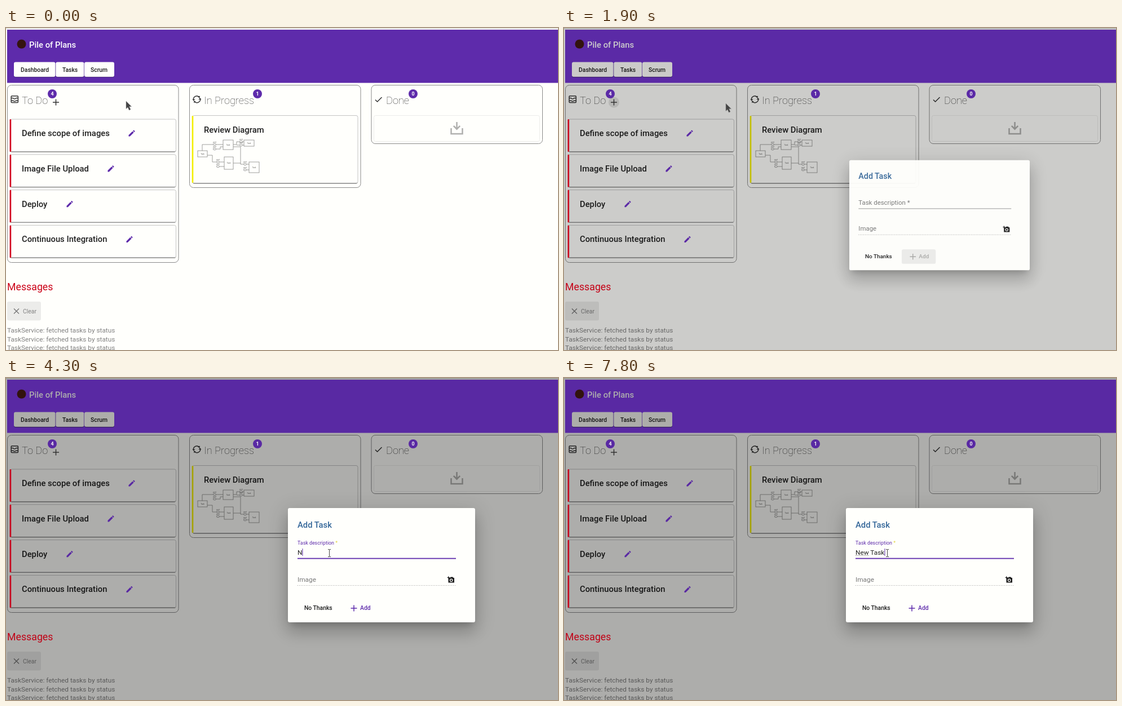
Animation, 979 px wide and 572 px high, one loop 8000 ms. Source, as an HTML page:

```html
<!DOCTYPE html>
<html lang="en">
<head>
<meta charset="utf-8">
<title>Task board</title>
<style>
  html, body { margin: 0; width: 100%; height: 100%; overflow: hidden; background: #fffffc; }
  #stage { position: absolute; left: 0; top: 0; width: 979px; height: 572px; overflow: hidden; background: #fffffc; }
  svg { position: absolute; left: 0; top: 0; display: block; font-family: Roboto, sans-serif; font-size: 11.84px; }
  text { white-space: pre; }
  .btn { font-size: 10.36px; font-weight: 500; }
  .title { font-size: 14.8px; font-weight: 500; fill: #212121; }
  .head { font-size: 18.2px; font-weight: 100; fill: #333; }
  .line { fill: none; stroke: #333; stroke-width: 1.5; }
  .wire { fill: none; stroke: #777; stroke-width: .7; }
  .tiny { font-size: 3px; fill: #555; text-anchor: middle; }
  #dialog {
    position: absolute; left: 500px; top: 231px; width: 332px; height: 203px;
    background: #fffffc; border-radius: 3px;
    box-shadow: 0 8px 11px -5px rgba(0,0,0,.2), 0 18px 28px 2px rgba(0,0,0,.14), 0 7px 34px 6px rgba(0,0,0,.12);
  }
</style>
</head>
<body>
<div id="stage">
  <svg width="979" height="572" viewBox="0 0 979 572">
    <g id="board"></g>
    <rect id="dim" width="979" height="572"/>
    <g id="accents"></g>
    <circle id="ripple" cx="88.5" cy="132"/>
    <path d="M83 132h11M88.5 126.500v11" class="line"/>
  </svg>
  <div id="dialog">
    <svg width="332" height="203" viewBox="500 231 332 203">
      <text x="517" y="266" class="title" style="fill:#369">Add Task</text>
      <text id="label" x="517">Task description <tspan id="star">*</tspan></text>
      <text id="input" x="517" y="313.500" fill="#222"></text>
      <path id="spell" stroke="#888" stroke-dasharray="1.5 1"/>
      <rect id="caret" y="303" width="1" height="13" fill="#5e2bab"/>
      <path d="M517 320.500H798" stroke="#929292"/>
      <rect id="focus" x="517" y="319.700" height="1.800" fill="#5e2bab"/>
      <text x="517" y="361.500" fill="#777">Image</text>
      <path d="M517 368.500H798" stroke="#999" stroke-dasharray="1 2"/>
      <path d="M785.500 355h2l1-1.500h4l1 1.500h1.500v8.500h-10.500v-6" fill="#1c1c1c"/>
      <path d="M782.500 354.500h4.500M784.700 352.300v4.500" stroke="#1c1c1c" stroke-width="1.200"/>
      <circle cx="789.700" cy="359.300" r="2.200" fill="#1c1c1c" stroke="#fffffc" stroke-width="1.200"/>
      <text x="529" y="412" class="btn" fill="#1c1c1c">No Thanks</text>
      <rect id="addBg" x="596.500" y="395.500" width="62.500" height="26.500" rx="3" fill="#ececea"/>
      <path id="addPlus" d="M611.500 409h11M617 403.500v11" stroke-width="1.500"/>
      <text id="addText" x="628" y="412" class="btn">Add</text>
    </svg>
  </div>
  <svg width="979" height="572" viewBox="0 0 979 572">
    <path id="arrow" d="M0 0V13.500L3 10.800 5.400 16 8 14.800 5.600 9.600H9.500Z" fill="#444" stroke="#888" stroke-width=".5"/>
    <path id="beam" d="M-2.500-6.500h2l.5.500.5-.500h2M0-6V6M-2.500 6.500h2l.5-.500.5.500h2" fill="none" stroke="#444"/>
  </svg>
</div>
<script>
const $ = id => document.getElementById(id);
const set = (id, attrs) => { for (const k in attrs) $(id).setAttribute(k, attrs[k]); };
const text = (x, y, s, attrs = '') => `<text x="${x}" y="${y}" ${attrs}>${s}</text>`;
const rect = (x, y, w, h, attrs = '') => `<rect x="${x}" y="${y}" width="${w}" height="${h}" ${attrs}/>`;
const path = (d, attrs = 'class="line"') => `<path d="${d}" ${attrs}/>`;

const card = (x, y, w, h) =>
  rect(x, y + 1, w, h, 'rx="3" fill="#999"') +
  rect(x, y, w, h, 'rx="3" fill="#fffffc" stroke="#c4c4c4"') +
  path(`M${x + 2} ${y + h + .3}h${w - 4}`, 'stroke="#8c8c8c" stroke-width="1.2"');
const bar = (y, h, x, color) => rect(x, y, 2.6, h, `rx="1.3" fill="${color}"`);
const pencil = (x, y) => path(
  'M3 17.250V21h3.750L17.810 9.940l-3.750-3.750zM20.710 7.040a1 1 0 000-1.410l-2.340-2.340a1 1 0 00-1.410 0l-1.830 1.830 3.750 3.750z',
  `transform="translate(${x - 7.4} ${y - 7.4}) scale(.62)" fill="#5e2bab"`);

const tasks = [['Define scope of images', 223], ['Image File Upload', 186], ['Deploy', 113], ['Continuous Integration', 219]];
const columns = [['To Do', 2.5, 28, 315, 82, 4], ['In Progress', 325.5, 351, 182, 446, 1], ['Done', 648, 674, 104, 722, 0]];
const rowY = i => 162 + i * 62.8;

function diagram() {
  const boxes = [[340, 218, 17, 11], [385, 199, 18, 17], [387, 229, 16, 22], [422, 199, 18, 11], [431, 238, 18, 19]];
  const ports = [[370, 207], [370, 215], [376, 238], [376, 246], [417, 202], [417, 208], [424, 242], [424, 252]];
  return path('M348 218V207H367M357 226H366V238H373M373 207H385M373 215H380V211H385M379 238H387M379 246H387' +
      'M403 207H409V202H414M403 211H416V242H421M409 208H414M420 202H422M420 208H422M403 240H416M427 242H431M427 252H431', 'class="wire"') +
    boxes.map(([x, y, w, h]) => rect(x, y, w, h, 'class="wire"') + text(x + w / 2, y + h / 2 + 1, 'Task', 'class="tiny"')).join('') +
    ports.map(([x, y]) => `<ellipse cx="${x}" cy="${y}" rx="2.6" ry="1.7" class="wire"/>` + text(x, y - 3, 'port', 'class="tiny"')).join('');
}

$('board').innerHTML =
  rect(0, 0, 979, 2, 'fill="#e5e5e7"') +
  columns.map(([name, x, tx, h]) =>
    rect(x, 101.5, 303.5, h, 'rx="7" fill="none" stroke="#8a8a8a"') + text(tx, 135, name, 'class="head"')).join('') +
  tasks.map(([name], i) => card(7.5, rowY(i), 294, 57.5) + text(28, rowY(i) + 30, name, 'class="title"')).join('') +
  rect(9.2, 120.7, 12.2, 11.8, 'rx="1.2" class="line"') +
  path('M9 124.500h3.500q2.700 3 5.500 0h3.500M9 129h3.500q2.700 2.500 5.500 0h3.500') +
  path('M332.500 128a6 6 0 0 1 10-5.500M344.500 125.500a6 6 0 0 1-10 5.500') +
  path('M330.500 126.500h5l-2.800 3zM341.500 127h5l-2.500-3zM340 122.500l3.800-2v4zM337 131l-3.800 2v-4z', 'fill="#333"') +
  path('M655 127.500l3.500 3.500 8-8') +
  card(330.5, 155.5, 293.5, 120) + bar(156, 119, 329.7, '#f3ee00') +
  text(351, 186, 'Review Diagram', 'class="title"') + diagram() +
  rect(652.5, 155.5, 294, 46, 'rx="3" fill="none" stroke="#ececea"') +
  path('M789.500 178V188H809.500V178', 'fill="none" stroke="#b0b0ae" stroke-width="2.500"') +
  path('M798.300 167h2.500v9.500l3.500-3.500 1.800 1.800-6.600 6.600-6.600-6.600 1.800-1.800 3.600 3.500z', 'fill="#b0b0ae"') +
  rect(2, 486, 60, 33.5, 'rx="3" fill="#ececea"') +
  path('M14 498.500l9 9m0-9l-9 9', 'stroke="#777" stroke-width="1.400"') +
  text(30, 506.5, 'Clear', 'class="btn" style="font-weight:400" fill="#808080"') +
  [541, 556.5, 572].map(y => text(2, y, 'TaskService: fetched tasks by status', 'fill="#828282"')).join('');

$('accents').innerHTML =
  rect(2, 3, 977, 94.5, 'fill="#5e2bab"') +
  '<circle cx="27.500" cy="28.500" r="8" fill="#35140f"/>' +
  '<g id="nav">' + text(41, 35, 'Pile of Plans', 'class="title" style="fill:#fff"') +
  [['Dashboard', 14, 73.5, 26], ['Tasks', 88.3, 50, 100], ['Scrum', 139, 53, 150]].map(([s, x, w, tx]) =>
    rect(x, 61.5, w, 26.2, 'rx="3" fill="#3e1b76"') + rect(x, 60.5, w, 26.2, 'rx="3" fill="#fffffc"') +
    text(tx, 77.5, s, 'class="btn" fill="#1c1c1c"')).join('') + '</g>' +
  columns.map(([, , , , x, n]) => `<circle cx="${x}" cy="117" r="8" fill="#5e2bab"/>` +
    text(x, 120.2, n, 'font-size="8.900" font-weight="600" fill="#fff" text-anchor="middle"')).join('') +
  tasks.map(([, x], i) => bar(rowY(i), 58, 6.6, '#d1001c') + pencil(x, rowY(i) + 25)).join('') +
  text(2, 466, 'Messages', 'font-size="17.760" fill="#cb0016"');

// Keyed states: [start ms, ...values]
const pointer = [[0, 213, 130], [500, 165, 130], [600, 124, 130], [900, 99, 135], [1200, 91, 135], [1400, 82, 134],
  [1900, 287, 134], [2000, 320, 133], [2600, 579, 302], [2800, 577, 321], [2900, 575, 318], [3000, 574, 314], [3100, 573.5, 311]];
const ripples = [[0, 0, '#000', 0], [900, 14.5, '#000', .07], [1800, 14.5, '#b8c0c3', .95], [1900, 9.5, '#000', .1], [2000, 14.5, '#000', .09]];
const opening = [[0, 0, .8, 0], [1800, .05, .8, .4], [1900, .2, .964, .95], [2000, .32, 1, 1]];
const typed = [[0, ''], [4300, 'N'], [4600, 'Nw'], [5000, 'Nw '], [5400, 'Nw'], [5800, 'N'], [6400, 'Ne'], [6700, 'New'],
  [7100, 'New '], [7400, 'New T'], [7600, 'New Ta'], [7800, 'New Task']];
const labels = [[0, 313.5, 11.84, 0], [3300, 297.5, 9.25, 279], [3400, 295.8, 8.95, 281], [3500, 295.5, 8.88, 281]];
const at = (keys, t) => keys.filter(k => k[0] <= t).pop().slice(1);

const pen = document.createElement('canvas').getContext('2d');
const width = s => { pen.font = '11.84px Roboto, sans-serif'; return pen.measureText(s).width; };

function drawPointer(t) {
  let [x, y] = at(pointer, t);
  if (t > 2000 && t < 2600) {
    const p = (t - 2000) / 600;
    x = 320 + 259 * Math.sin(p * Math.PI / 2);
    y = 133 + 169 * p;
  }
  const beam = t >= 2600;
  set('arrow', { transform: `translate(${x} ${y})`, visibility: beam ? 'hidden' : 'visible' });
  set('beam', { transform: `translate(${x} ${y})`, visibility: beam ? 'visible' : 'hidden' });
}

function drawField(t) {
  const [y, size, line] = at(labels, t);
  const focused = t >= 3300;
  set('label', { y, 'font-size': size, fill: focused ? '#5e2bab' : '#777' });
  set('star', { fill: focused ? '#e3d23c' : '#777' });
  set('focus', { width: line });

  const [value] = at(typed, t);
  $('input').textContent = value;
  set('caret', { x: 517 + width(value), visibility: focused ? 'visible' : 'hidden' });
  const word = t >= 7100 ? 'New' : t >= 5100 && t < 5400 ? 'Nw' : '';
  set('spell', { d: word ? `M517 315.500h${width(word)}` : 'M0 0' });

  const ready = value !== '';
  set('addBg', { visibility: ready ? 'hidden' : 'inherit' });
  set('addPlus', { stroke: ready ? '#5e2bab' : '#a8a8a6' });
  set('addText', { fill: ready ? '#5e2bab' : '#a8a8a6' });
}

function draw(now) {
  const t = Math.floor(now % 8000 / 100) * 100;
  const [dim, scale, alpha] = at(opening, t);
  set('dim', { 'fill-opacity': dim });
  $('accents').style.filter = `brightness(${1 - dim * .15})`;
  $('nav').style.filter = `brightness(${1 - dim * .9})`;
  $('dialog').style.transform = `scale(${scale})`;
  $('dialog').style.opacity = alpha;

  const [r, fill, opacity] = at(ripples, t);
  const fade = t > 2000 ? Math.max(0, 1 - (t - 2000) / 500) : 1;
  set('ripple', { r, fill, opacity: opacity * fade });
  drawPointer(t);
  drawField(t);
}

function loop() {
  draw(performance.now());
  requestAnimationFrame(loop);
}
loop();
</script>
</body>
</html>
```
